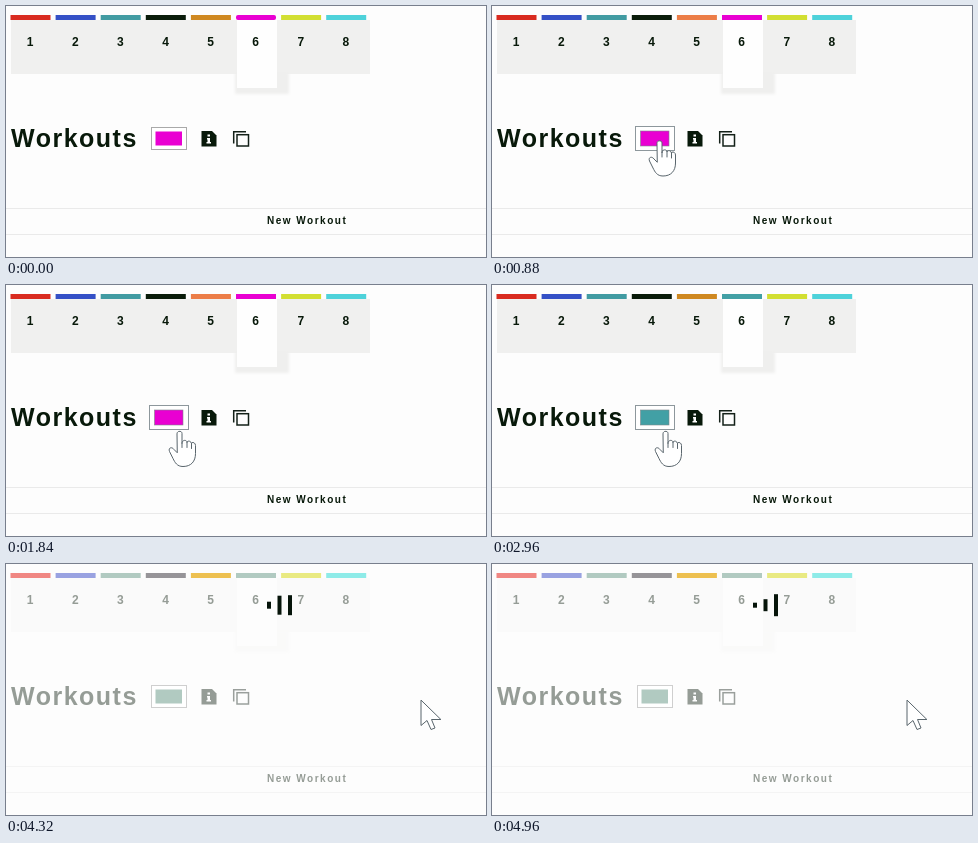
These frames come from a looping animation (480x251 px, 5040 ms). An HTML page:

```html
<!DOCTYPE html>
<html lang="en">
<head>
<meta charset="utf-8">
<title>Workouts</title>
<style>
html, body { margin: 0; width: 100%; height: 100%; overflow: hidden; background: #fdfdfd; }
svg { display: block; width: 100vw; height: 100vh; }
text { font-family: "Liberation Sans", Arial, sans-serif; font-weight: bold; fill: #08190a; }
.num { font-size: 12px; text-anchor: middle; }
.cursor { fill: #fff; stroke: #59656c; stroke-width: 1; stroke-linejoin: round; stroke-linecap: round; }
</style>
</head>
<body>
<svg viewBox="0 0 480 251">
  <defs>
    <filter id="soft" x="-20%" y="-40%" width="140%" height="180%"><feGaussianBlur stdDeviation="1.5"/></filter>
  </defs>
  <rect width="480" height="251" fill="#fdfdfd"/>
  <g id="page">
    <g id="panel">
      <rect x="5" y="14" width="359" height="54" fill="#f0f0ef"/>
      <rect x="229" y="66" width="54" height="22" fill="#efefee" filter="url(#soft)"/>
      <rect x="231" y="14" width="40" height="68" fill="#fefefe"/>
    </g>
    <g id="nums"></g>
    <text x="5" y="141" font-size="25" letter-spacing="1.5">Workouts</text>
    <path d="M195.500 125H206l4.500 4.500V140.500H195.500Z" fill="#08190a"/>
    <path d="M201.500 128.500h2.500v2h-2.500zM201 132h3v4h1v1.500h-4.500V136h1v-2.500H201z" fill="#fff"/>
    <g fill="none" stroke="#132018" stroke-width="1.500">
      <path d="M227.700 137.500V125.700H240"/>
      <rect x="231" y="128.700" width="11.500" height="11.300"/>
    </g>
    <path d="M0 202.500H480M0 228.500H480" stroke="#eaeaea"/>
    <text x="261" y="218" font-size="10" letter-spacing="1.5">New Workout</text>
  </g>
  <g id="tabs"></g>
  <rect id="frame" fill="#fff"/>
  <rect id="swatch"/>
  <g id="loader" fill="#06140a"></g>
  <path id="arrow" class="cursor" d="M0 0V25L6 20L10 29L14 27.500L10.500 19H19.500Z"/>
  <path id="hand" class="cursor" d="M-2 2C-2 -1 3 -1 3 2V12C3 8 8 8 8 11C8 9 12 9 12.500 12C13 10 16.500 11 16.500 14V22C16.500 30 12 35 4 35C-2 35 -4 31 -6 27L-9.500 20C-11 16 -7 15 -5 18L-2 21ZM3 12V16M8 11V16M12.500 12V17"/>
</svg>
<script>
const LOOP = 5040, STEP = 80, BUSY = 4320, PICK = 2800;
const PINK = '#e900d2', TEAL = '#42a0a5', DIM_TEAL = '#b1cac1';
const COLORS = ['#d92b20', '#3450c6', '#419ba2', '#0a1c0a', '#cf8820', PINK, '#d2df32', '#4ed2da'];
const DIMMED = ['#f08783', '#99a2e1', DIM_TEAL, '#969498', '#edc050', DIM_TEAL, '#e9ea82', '#8eebe8'];

// time, x, y, shape
const MOVES = [
  [0, 0, 0, ''],
  [480, 392, 190, 'arrow'], [560, 330, 172, 'arrow'],
  [720, 255, 160, 'arrow'], [800, 200, 145, 'arrow'],
  [880, 167, 135, 'hand'], [960, 168, 138, 'hand'],
  [1040, 170, 142, 'hand'], [1120, 172, 145, 'hand'], [1200, 173, 146.5, 'hand'],
  [3680, 205, 160, 'arrow'], [3760, 290, 172, 'arrow'],
  [4000, 349.5, 171.5, 'arrow'], [4080, 393, 150, 'arrow'], [4160, 415, 136.5, 'arrow']
];

// loader bar heights, one row per step
const PULSE = [
  [7, 19, 20], [5, 13, 22], [9, 6, 18], [16, 7, 12], [21, 10, 6],
  [21, 17, 6], [15, 22, 12], [8, 20, 19], [5, 12, 22]
];

const $ = id => document.getElementById(id);
function add(parent, tag, attrs) {
  const el = document.createElementNS('http://www.w3.org/2000/svg', tag);
  set(el, attrs);
  return parent.appendChild(el);
}
function set(el, attrs) {
  for (const k in attrs) el.setAttribute(k, attrs[k]);
}

const tabs = COLORS.map((c, i) => {
  const x = 4.5 + i * 45.1;
  add($('nums'), 'text', { class: 'num', x: x + 19.7, y: 40 }).textContent = i + 1;
  return add($('tabs'), 'rect', { x, y: 9, width: 40, height: 5 });
});
const bars = [261, 271.5, 282].map(x => add($('loader'), 'rect', { x, width: 4 }));

function drawSwatch(t, busy) {
  const wide = t >= 880 && !busy;
  set($('frame'), wide
    ? { x: 143.5, y: 120.5, width: 39, height: 24, stroke: '#8d979c' }
    : { x: 145.5, y: 121.5, width: 35, height: 22, stroke: busy ? '#cfcfcf' : '#a9a9a9' });
  set($('swatch'), wide
    ? { x: 148.5, y: 125, width: 28.5, height: 15, stroke: '#7d858a', 'stroke-width': 0.6 }
    : { x: 149.5, y: 125.5, width: 26.5, height: 14, stroke: 'none' });
  set($('swatch'), { fill: busy ? DIM_TEAL : t >= PICK ? TEAL : PINK });
}

function drawTabs(t, busy) {
  tabs.forEach((tab, i) => {
    let fill = (busy ? DIMMED : COLORS)[i];
    if (i === 4 && t >= STEP && t < PICK) fill = '#ec7d47';
    if (i === 5 && t >= PICK && !busy) fill = TEAL;
    set(tab, { fill });
  });
  set(tabs[5], { rx: t < STEP ? 2 : 0 });
}

function drawCursor(t) {
  const [, x, y, shape] = MOVES.findLast(m => m[0] <= t);
  for (const id of ['arrow', 'hand']) {
    set($(id), { visibility: id === shape ? 'visible' : 'hidden', transform: `translate(${x} ${y})` });
  }
}

function drawLoader(t, busy) {
  set($('loader'), { visibility: busy ? 'visible' : 'hidden' });
  if (!busy) return;
  const row = PULSE[(t - BUSY) / STEP];
  bars.forEach((bar, i) => set(bar, { y: 41.2 - row[i] / 2, height: row[i] }));
}

function draw(now) {
  const t = Math.floor((now % LOOP) / STEP) * STEP;
  const busy = t >= BUSY;
  set($('page'), { opacity: busy ? 0.42 : 1 });
  set($('panel'), { opacity: busy ? 0.5 : 1 });
  drawTabs(t, busy);
  drawSwatch(t, busy);
  drawLoader(t, busy);
  drawCursor(t);
}

const start = performance.now();
function tick() {
  draw(performance.now() - start);
  requestAnimationFrame(tick);
}
tick();
</script>
</body>
</html>
```
